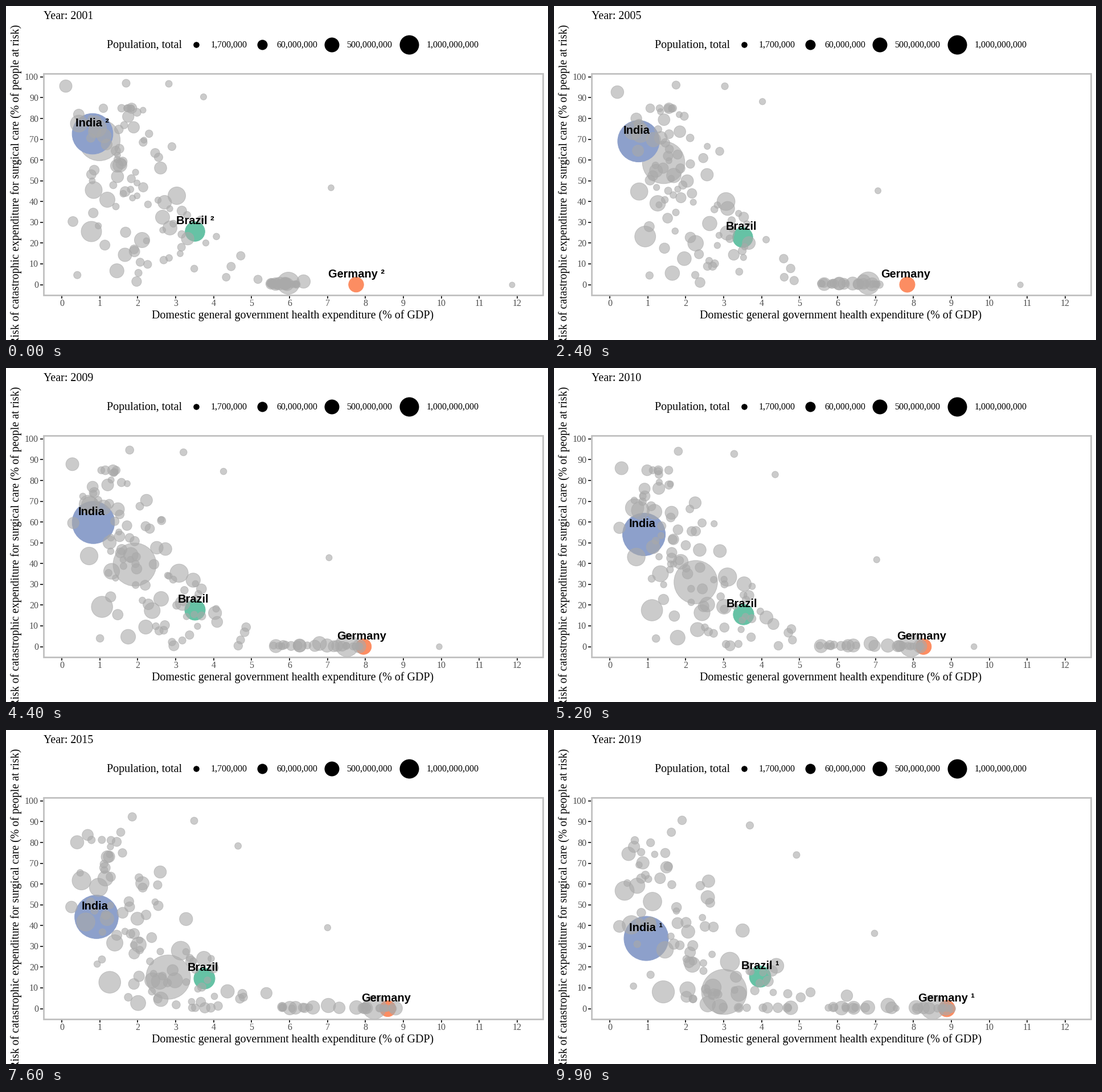
Animation of 952x588 px, one loop 10000 ms. Source, as a matplotlib script:

```python
import numpy as np
import matplotlib.pyplot as plt
from matplotlib.animation import FuncAnimation
from matplotlib.colors import to_rgba
from matplotlib.patches import Rectangle

W, H, DPI = 952, 588, 100
FRAMES, STEP = 100, 100
FIRST, LAST = 2001, 2019
PX = 72 / DPI
SERIF, SANS = "Liberation Serif", "Liberation Sans"
GREY = to_rgba("#a9a9a9", 0.6)
ZERO = 490.5  # stage height of zero risk

frames = np.arange(FRAMES)
years = np.linspace(0, FRAMES - 1, LAST - FIRST + 1)
keys = [0, 12, 36, 52, 65, 87, 99]
rng = np.random.default_rng(11)

slide = years / (FRAMES - 1)
fall = np.clip((years - 12) / 87, 0, 1)  # risk is level at first
radii, colors, paths = [], [], []


def add(r, xs, ys, at=years, color=GREY):
    """Add a bubble that moves straight from point to point."""
    radii.append(r)
    colors.append(to_rgba(color))
    paths.append(np.column_stack([np.interp(frames, at, xs),
                                  np.interp(frames, at, ys)]))
    return len(radii) - 1


def drift(sd):
    """Random walk from year to year, starting at zero."""
    return np.r_[0, np.cumsum(rng.normal(0, sd, LAST - FIRST))]


# The highlighted countries and the two largest others
brazil = add(17.3, [332, 332, 331, 333, 335, 362, 362],
             [397, 397, 418, 434, 439, 436, 434], keys, "#66c2a5")
add(36.5, [164, 182, 203, 249, 278, 292, 299],
    [236, 236, 315, 377, 421, 449, 461], keys)
germany = add(13.2, [615, 634, 607, 649, 657, 684, 690], [ZERO] * 7, keys, "#fc8d62")
india = add(35.8, [152, 148, 149, 158, 156, 162, 162],
            [225, 225, 251, 293, 306, 352, 367], keys, "#8da0cb")
us_x = [496, 533, 571, 627, 626, 668, 665]
add(19.5, us_x, [488] * 7, keys)

# Other large or outlying countries: radius, start, end
for r, (x0, y0), (x1, y1) in [
    (18, (150, 397), (192, 461)),
    (15.5, (300, 334), (309, 408)),
    (15.5, (161, 215), (124, 283)),
    (15, (154, 324), (136, 343)),
    (15, (128, 207), (173, 302)),
    (13.5, (178, 341), (195, 387)),
    (12.5, (200, 280), (243, 413)),
    (13.5, (239, 412), (279, 453)),
    (12, (209, 438), (291, 487)),
    (11, (105, 141), (131, 218)),
    (7, (211, 136), (225, 159)),
    (6, (286, 137), (344, 168)),
    (5.5, (347, 160), (426, 220)),
    (5.3, (571, 320), (563, 358)),
    (5, (889, 491), (601, 490)),
]:
    add(r, x0 + (x1 - x0) * slide, y0 + (y1 - y0) * fall)

# The cloud: risk falls towards zero while spending spreads out
for u in np.linspace(0, 1, 88):
    y0 = 157 + 328 * u
    y1 = ZERO - 300 * ((ZERO - y0) / 334) ** 1.7
    spread = 30 + 36 * u
    x0 = 202 + 0.75 * max(0, y0 - 320) + rng.normal(0, spread)
    x1 = 150 + 240 * ((y1 - 190) / 300) ** 1.6 + rng.normal(0, spread)
    xs = x0 + (x1 - x0) * slide + drift(6)
    ys = y0 + (y1 - y0) * fall + drift(4) * fall
    r = min(5.3 + rng.exponential(2.6), 12.5)
    add(r, np.maximum(xs, 112 + 8 * rng.random()), np.clip(ys, 180, 489))

# High spenders near zero risk: one group moves with the leader, one lags
lead = np.interp(years, keys, us_x)
lag = 485 + 40 * slide
for k in range(24):
    base, lift = (lead, 1.5) if k % 2 else (lag, 4)
    xs = base + rng.normal(0, 1) * (20 + 16 * slide) + drift(4)
    y = ZERO - abs(rng.normal(0, lift))
    add(min(5.5 + rng.exponential(2), 12), xs, np.full(len(years), y))

xy = np.array(paths)
radii = np.array(radii)

fig = plt.figure(figsize=(W / DPI, H / DPI), dpi=DPI, facecolor="white")
ax = fig.add_axes([0, 0, 1, 1])
ax.set(xlim=(0, W), ylim=(H, 0))
ax.axis("off")


def text(x, y, s, size=20, **kw):
    kw = {"family": SERIF, "color": "black", "va": "baseline", **kw}
    return ax.text(x, y, s, fontsize=size * PX, **kw)


def tick(xs, ys):
    ax.plot(xs, ys, color="#333333", lw=2 * PX, solid_capstyle="butt", zorder=1)


# Panel, axes and titles
ax.add_patch(Rectangle((66, 118.5), 876.5, 390.5, fill=False,
                       ec="#bebebe", lw=2.7 * PX, zorder=4))
for v in range(13):
    x = 98 + 66.65 * v
    tick([x, x], [510, 515])
    text(x, 528, str(v), 16, ha="center", color="#4d4d4d")
for v in range(0, 101, 10):
    y = ZERO - 3.656 * v
    tick([60, 65], [y, y])
    text(57, y + 5.5, str(v), 16, ha="right", color="#4d4d4d")
text(503.5, 550, "Domestic general government health expenditure (% of GDP)",
     ha="center")
text(23, 314, "Risk of catastrophic expenditure for surgical care "
     "(% of people at risk)", ha="center", rotation=90, rotation_mode="anchor")

# Size legend
text(177, 74, "Population, total")
for x, r, tx, label in [(334, 5.3, 360, "1,700,000"),
                        (449.5, 9, 475, "60,000,000"),
                        (572, 13, 598, "500,000,000"),
                        (708, 17, 739, "1,000,000,000")]:
    ax.scatter([x], [68], s=(2 * r * PX) ** 2, c="black", lw=0)
    text(tx, 73, label, 16)

title = text(66, 23, "")
dots = ax.scatter(xy[:, 0, 0], xy[:, 0, 1], s=(2 * radii * PX) ** 2,
                  facecolors=colors, edgecolors=colors, linewidths=PX, zorder=3)
tags = [(k, name, text(0, 0, "", family=SANS, weight="bold", ha="center", zorder=5))
        for k, name in [(brazil, "Brazil"), (germany, "Germany"), (india, "India")]]


def update(i):
    t = i / (FRAMES - 1)
    year = round(FIRST + (LAST - FIRST) * t)
    title.set_text(f"Year: {year}")
    dots.set_offsets(xy[:, i])
    dots.set_sizes((2 * radii * (1 + 0.09 * t) * PX) ** 2)
    note = {FIRST: " ²", LAST: " ¹"}.get(year, "")
    for k, name, tag in tags:
        x, y = xy[k, i]
        tag.set_text(name + note)
        tag.set_position((x if note else x - 3, y - 13))
    return [title, dots, *(tag for *_, tag in tags)]


anim = FuncAnimation(fig, update, frames=FRAMES, interval=STEP,
                     repeat=True, repeat_delay=0, blit=False)
plt.show()
```
